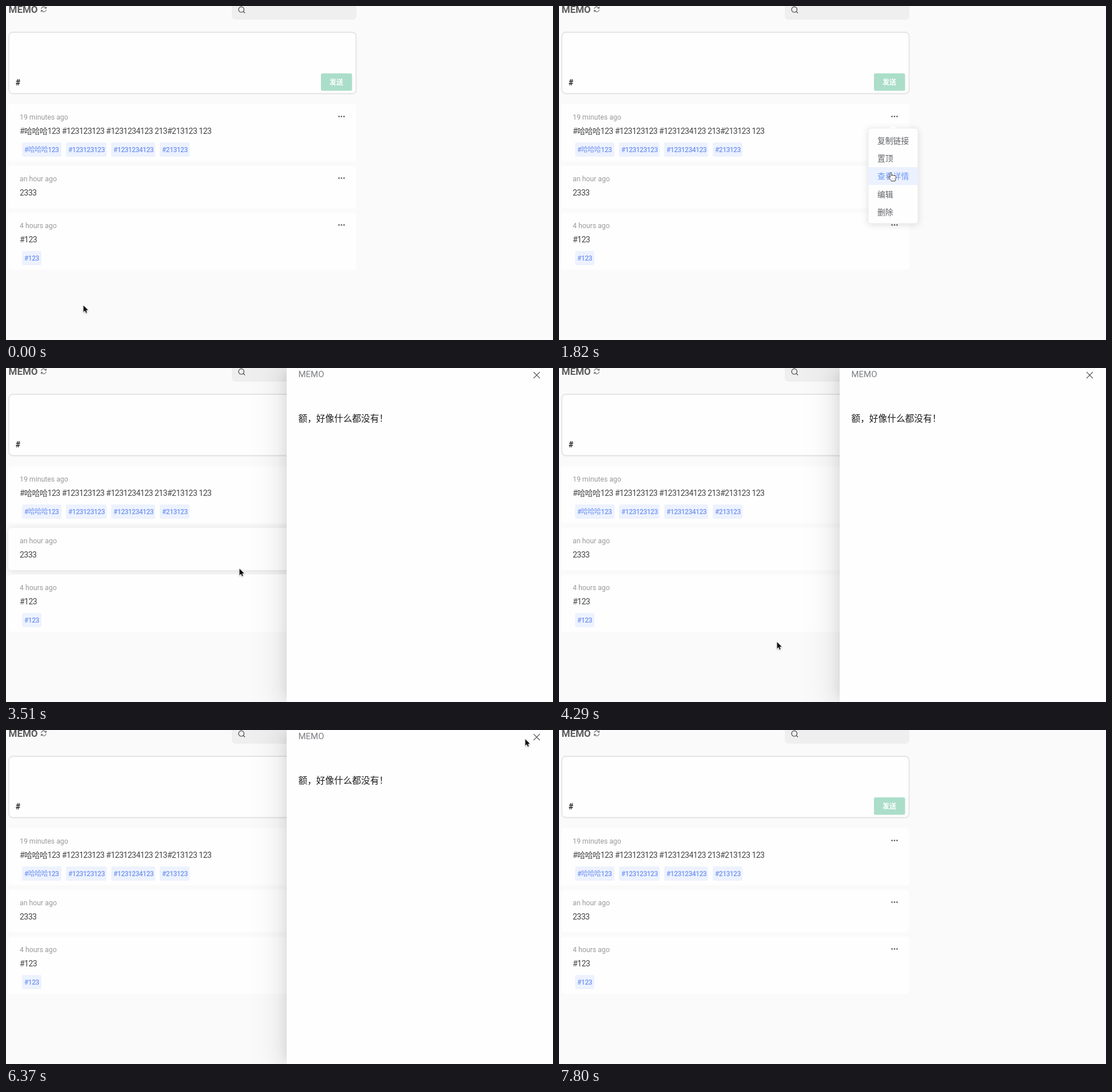
Write an HTML page with a canvas that moves like this. It is 957 px wide and 585 px high and loops after 7930 ms.

```html
<!DOCTYPE html>
<html lang="zh">
<head>
<meta charset="utf-8">
<title>Memo</title>
<style>
  html, body { margin: 0; width: 100%; height: 100%; overflow: hidden; background: #fafafa; }
  canvas { display: block; }
</style>
</head>
<body>
<canvas id="stage" width="957" height="585"></canvas>
<script>
const W = 957, H = 585, LOOP = 7930, STEP = 130;
const ctx = document.getElementById('stage').getContext('2d');
const FAMILY = 'Roboto, "Noto Sans CJK SC", "Noto Sans CJK", sans-serif';
const DRAWER_X = 491;

const cards = [
  { y: 172, h: 100, time: '19 minutes ago',
    text: '#哈哈哈123 #123123123 #1231234123 213#213123 123',
    tags: [['#哈哈哈123', 28, 69], ['#123123123', 105, 71], ['#1231234123', 184, 77], ['#213123', 269, 52]] },
  { y: 280, h: 74, time: 'an hour ago', text: '2333', tags: [] },
  { y: 362, h: 100, time: '4 hours ago', text: '#123', tags: [['#123', 28, 34]] }
];
const menu = ['复制链接', '置顶', '查看详情', '编辑', '删除'];

// pointer path: time, x, y
const path = [
  [0, 135.5, 524.5], [390, 300, 400], [910, 560, 212], [1040, 587, 194], [1250, 586, 195],
  [1430, 586, 232], [1600, 584, 265], [1820, 580.5, 291.5], [2000, 581, 293.5],
  [3000, 581, 293.5], [3250, 500, 325], [3510, 408.5, 351.5], [4160, 385, 470],
  [4420, 378, 490], [4700, 375, 488], [5200, 365.5, 402.5], [5590, 385, 488],
  [5980, 560, 330], [6370, 908.5, 16], [6560, 926, 12], [6800, 926, 12], [7200, 945, -25]
];

const arrowShape = new Path2D('M0 0V11.4L2.6 9.1L4.4 13L6.3 12.2L4.6 8.4L8 8.1Z');
const handShape = new Path2D('M-1.3 9V1.6a1.3 1.3 0 0 1 2.6 0V6a1.3 1.3 0 0 1 2.6-.1a1.3 1.3 0 0 1 2.6.4' +
  'a1.2 1.2 0 0 1 2.4.5V10c0 2-1.3 3-1.3 5H1C.5 13-2 11.5-3.7 8.8a1.2 1.2 0 0 1 2-1.3z');

const clamp = v => Math.max(0, Math.min(1, v));
const ramp = (t, from, to) => clamp((t - from) / (to - from));
const ease = v => v * v * (3 - 2 * v);

function pointerAt(t) {
  const i = path.findIndex(p => p[0] > t);
  if (i < 0) return { x: 945, y: -25 };
  const [t0, x0, y0] = path[i - 1], [t1, x1, y1] = path[i];
  const k = ramp(t, t0, t1);
  return { x: x0 + (x1 - x0) * k, y: y0 + (y1 - y0) * k };
}

function text(s, x, y, size, color, weight = 400, spacing = 0) {
  ctx.font = `${weight} ${size}px ${FAMILY}`;
  ctx.letterSpacing = spacing + 'px';
  ctx.fillStyle = color;
  ctx.fillText(s, x, y);
}

function box(x, y, w, h, r, fill, border, line = 1) {
  ctx.beginPath();
  ctx.roundRect(x, y, w, h, r);
  ctx.fillStyle = fill;
  ctx.fill();
  if (border) stroke(border, line);
}

function stroke(color, width) {
  ctx.strokeStyle = color;
  ctx.lineWidth = width;
  ctx.stroke();
}

// paints only the shadow; the caster stays off stage
function shadow(x, y, w, h, dx, dy, blur, spread, alpha) {
  const away = 3000;
  ctx.save();
  ctx.shadowColor = `rgba(0,0,0,${alpha})`;
  ctx.shadowBlur = blur;
  ctx.shadowOffsetX = away + dx;
  ctx.shadowOffsetY = dy;
  ctx.fillStyle = '#000';
  ctx.fillRect(x - away - spread, y - spread, w + spread * 2, h + spread * 2);
  ctx.restore();
}

function drawHeader() {
  text('MEMO', 4.5, 12, 17, '#5c5c5c', 700);

  ctx.save();
  ctx.translate(66, 5.8);
  for (let i = 0; i < 2; i++) {
    ctx.beginPath();
    ctx.arc(0, 0, 4.4, Math.PI * 1.05, Math.PI * 1.85);
    ctx.moveTo(4.6, -4.6);
    ctx.lineTo(4.2, -1.6);
    ctx.lineTo(1.4, -2.2);
    stroke('#666', 1.1);
    ctx.rotate(Math.PI);
  }
  ctx.restore();

  box(395, -12, 218, 36, 7, '#efefef');
  ctx.beginPath();
  ctx.arc(411.7, 6.2, 4.8, 0, Math.PI * 2);
  ctx.moveTo(415.2, 9.7);
  ctx.lineTo(418, 12.5);
  stroke('#444', 1.2);
}

function drawEditor() {
  box(5, 46, 607.5, 107.5, 7, '#fefefe', '#e4e4e4', 1.8);
  text('#', 16.5, 138.5, 14, '#111', 500);
  box(551, 118, 54.5, 30.5, 3, '#abdec9');
  text('发送', 566, 138, 12, '#fff', 700);
}

function drawCard(card, hover) {
  const { y, h } = card;
  if (hover) shadow(4, y, 609, h, 0, 2, 12, 0, 0.11);
  box(4, y, 609, h, 5, '#fefefe');
  text(card.time, 24, y + 27, 12.3, '#999');
  text(card.text, 24, y + 52, 14, '#444', 400, -0.5);
  for (const [label, x, w] of card.tags) {
    box(x, y + 67, w, 25, 3, '#edf2fe');
    text(label, x + 4, y + 84, 12, '#7496f2', 500, -0.5);
  }
  ctx.fillStyle = '#555';
  for (let i = -1; i <= 1; i++) {
    ctx.beginPath();
    ctx.arc(587 + i * 4.4, y + 21.5, 1.35, 0, Math.PI * 2);
    ctx.fill();
  }
}

function drawMenu(alpha, p) {
  if (!alpha) return;
  const rowH = 31.3, top = 219.6;
  ctx.save();
  ctx.globalAlpha = alpha;
  shadow(541, 214, 87, 167, 0, 2, 12, 0, 0.13);
  box(541, 214, 87, 167, 4, '#fefefe', '#e9ebef');
  ctx.beginPath();
  ctx.moveTo(578.5, 214.5);
  ctx.lineTo(584.5, 209);
  ctx.lineTo(590.5, 214.5);
  ctx.fillStyle = '#fefefe';
  ctx.fill();
  menu.forEach((label, i) => {
    const y = top + i * rowH;
    const hot = p.y >= y && p.y < y + rowH;
    if (hot) {
      ctx.fillStyle = '#ebf1fe';
      ctx.fillRect(541.5, y, 86, rowH);
    }
    text(label, 557, y + 21, 13.8, hot ? '#6d97f5' : '#606266', 500);
  });
  ctx.restore();
}

function drawDrawer(open) {
  if (!open) return;
  const x = DRAWER_X + (W - DRAWER_X) * (1 - open);
  const w = W - DRAWER_X;
  shadow(x, 0, w, H, -16, 0, 48, 16, 0.035);
  shadow(x, 0, w, H, -12, 0, 32, 0, 0.06);
  shadow(x, 0, w, H, -8, 0, 16, -8, 0.08);
  ctx.fillStyle = '#fefefe';
  ctx.fillRect(x, 0, w, H);
  text('MEMO', x + 20.5, 16, 15, '#7c7f83');
  text('额，好像什么都没有！', x + 20.5, 93.5, 15.7, '#1c1c1c', 500);
  ctx.beginPath();
  for (const s of [-1, 1]) {
    ctx.moveTo(x + 437.5 - 5.5, 12.5 - 5.5 * s);
    ctx.lineTo(x + 437.5 + 5.5, 12.5 + 5.5 * s);
  }
  stroke('#555', 1.1);
}

function drawPointer(p, hand) {
  ctx.save();
  ctx.translate(p.x, p.y);
  ctx.lineJoin = 'round';
  ctx.shadowColor = hand ? 'rgba(0,0,0,.12)' : 'rgba(0,0,0,.3)';
  ctx.shadowBlur = 2;
  ctx.shadowOffsetY = 1;
  ctx.strokeStyle = hand ? '#444' : '#fff';
  ctx.fillStyle = hand ? '#fff' : '#111';
  ctx.lineWidth = hand ? 1 : 1.6;
  const shape = hand ? handShape : arrowShape;
  if (hand) ctx.fill(shape);
  ctx.shadowColor = hand ? 'transparent' : ctx.shadowColor;
  ctx.stroke(shape);
  ctx.shadowColor = 'transparent';
  if (!hand) ctx.fill(shape);
  else {
    ctx.beginPath();
    for (const x of [2.2, 4.4, 6.6]) {
      ctx.moveTo(x, 10);
      ctx.lineTo(x, 12.5);
    }
    stroke('#999', 0.7);
  }
  ctx.restore();
}

function render(t) {
  const p = pointerAt(t);
  const menuAlpha = ramp(t, 1200, 1400) * (1 - ramp(t, 2100, 2300));
  const open = ease(ramp(t, 2160, 2470)) * (1 - ease(ramp(t, 6680, 6990)));
  const drawerEdge = DRAWER_X + (W - DRAWER_X) * (1 - open);
  const onMenu = menuAlpha > 0 && p.y > 209;
  const hoverable = !onMenu && p.x < Math.min(613, drawerEdge);
  const onDots = t >= 1040 && t < 1300;
  const onClose = t > 6450 && t < 6800;
  const hand = onDots || onClose || (t >= 1300 && t <= 3000);

  ctx.fillStyle = '#fafafa';
  ctx.fillRect(0, 0, W, H);
  drawHeader();
  drawEditor();
  for (const c of cards) drawCard(c, hoverable && p.y >= c.y && p.y < c.y + c.h);
  drawMenu(menuAlpha, p);
  drawDrawer(open);
  drawPointer(p, hand);
}

const start = performance.now();
function frame(now) {
  const t = Math.max(0, now - start) % LOOP;
  render(Math.floor(t / STEP) * STEP);
  requestAnimationFrame(frame);
}
render(0);
requestAnimationFrame(frame);
</script>
</body>
</html>
```
